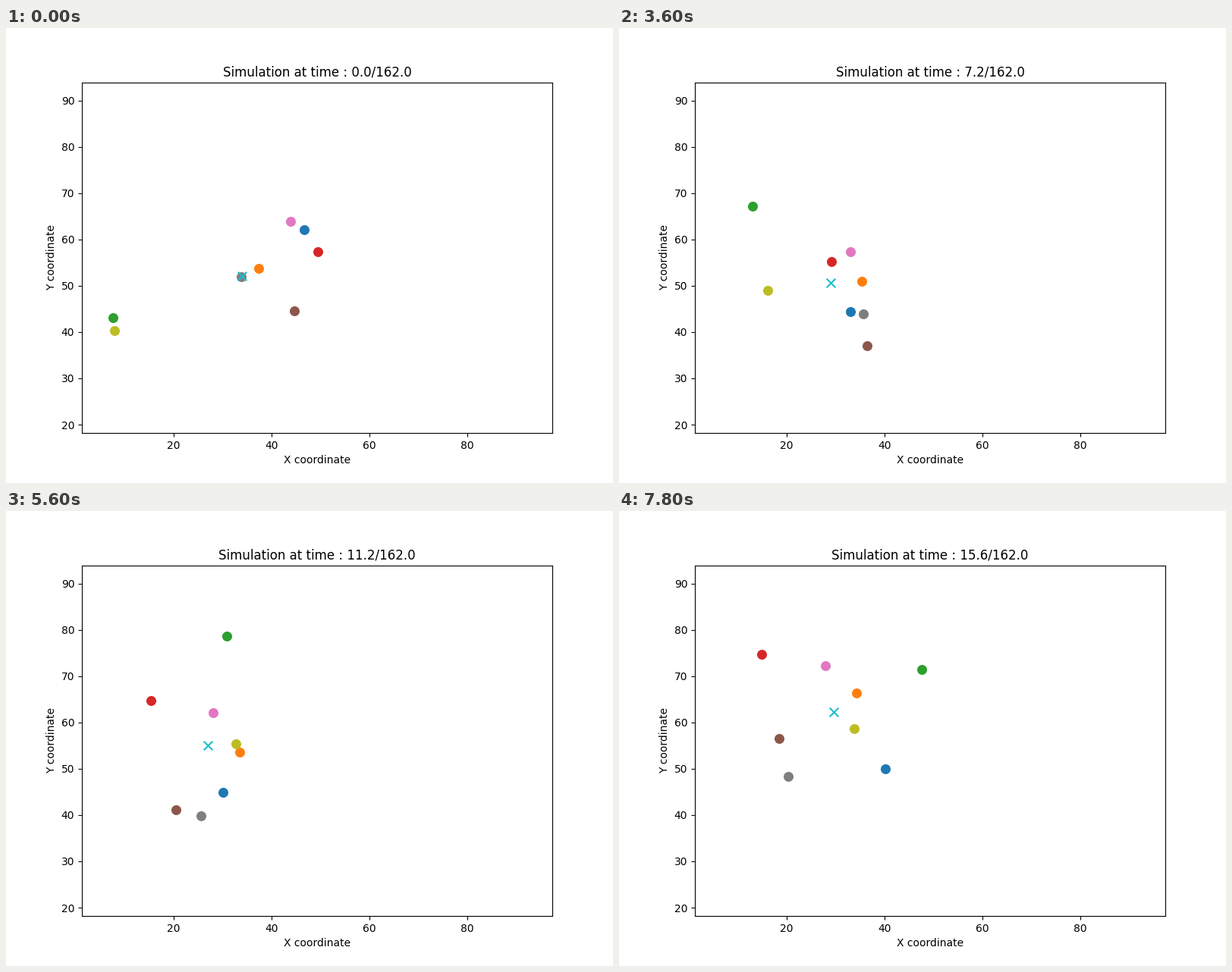
Write a matplotlib script that moves like this. It is 800 by 600 pixels and loops after 8000 ms.

```python
import numpy as np
import matplotlib.pyplot as plt
from matplotlib.animation import FuncAnimation

FRAMES = 40
STEP_MS = 200
STEP_TIME = 0.4
END_TIME = 162.0
XLIM = (1.24, 97.36)
YLIM = (18.2, 93.85)
BOX = (100, 720, 72, 534)  # axes left, right, top, bottom in pixels

KEYS = [0, 6, 13, 18, 25, 32, 39]

# Waypoints (x, y) in stage pixels, one per key, in drawing order
PATHS = {
    "tab:blue": [(393, 265.5), (367, 315.7), (328.5, 372), (304.5, 374.2),
                 (279, 375), (305.5, 361.7), (351.2, 340.3)],
    "tab:orange": [(333, 316.5), (348.5, 330), (336.5, 333), (319.7, 334.3),
                   (304, 326.4), (315.5, 299.2), (312.7, 240)],
    "tab:green": [(141.2, 381.5), (119, 356.4), (153.5, 291), (176, 234.5),
                  (255.8, 171), (335.7, 172.5), (399.2, 208.8)],
    "tab:red": [(411, 295), (397, 304), (337.6, 331.7), (279.5, 308.2),
                (209, 269.2), (175.2, 225.2), (188, 189.4)],
    "tab:brown": [(379.5, 372.5), (370.5, 395.8), (347.8, 413.6), (326.7, 418.7),
                  (250.3, 403.5), (200.2, 373.3), (211.4, 300)],
    "tab:pink": [(374.7, 254.7), (337.4, 297.6), (318, 306.6), (304.5, 295),
                 (287.3, 279), (258, 245), (272.4, 204.2)],
    "tab:gray": [(310, 328), (351.2, 325.8), (348.6, 355.8), (322.2, 376.6),
                 (272, 401.7), (240.8, 399.5), (222.5, 349.8)],
    "tab:olive": [(142.7, 399), (106.4, 380.2), (144, 367.5), (195.8, 345.6),
                  (279.8, 308.5), (321, 309.4), (310, 287)],
}

# Extra waypoints where a dot turns sharply
TURNS = {
    "tab:red": {34: (169.6, 214), 36: (174, 204)},
    "tab:gray": {30: (248, 400.3), 36: (228.5, 378)},
}


def to_data(points):
    left, right, top, bottom = BOX
    x = np.interp(points[:, 0], (left, right), XLIM)
    y = np.interp(points[:, 1], (top, bottom), YLIM[::-1])
    return np.column_stack([x, y])


def smooth_path(color):
    """Cubic Hermite curve through the waypoints, sampled at every frame."""
    stops = dict(zip(KEYS, PATHS[color])) | TURNS.get(color, {})
    t = np.array(sorted(stops), dtype=float)
    p = to_data(np.array([stops[k] for k in sorted(stops)]))
    slope = np.gradient(p, t, axis=0, edge_order=2)
    frames = np.arange(FRAMES)
    i = np.clip(np.searchsorted(t, frames, side="right") - 1, 0, len(t) - 2)
    span = (t[i + 1] - t[i])[:, None]
    s = (frames - t[i])[:, None] / span
    return ((2 * s**3 - 3 * s**2 + 1) * p[i]
            + (3 * s**2 - 2 * s**3) * p[i + 1]
            + (s**3 - 2 * s**2 + s) * span * slope[i]
            + (s**3 - s**2) * span * slope[i + 1])


tracks = np.array([smooth_path(c) for c in PATHS])
centroid = tracks.mean(axis=0)

fig, ax = plt.subplots(figsize=(8, 6), dpi=100)
ax.set(xlim=XLIM, ylim=YLIM, xlabel="X coordinate", ylabel="Y coordinate")
ax.set_xticks(range(20, 81, 20))
title = ax.set_title("")
dots = [ax.scatter([], [], s=70, color=c) for c in PATHS]
cross = ax.scatter([], [], s=70, color="tab:cyan", marker="x")


def update(n):
    for dot, track in zip(dots, tracks):
        dot.set_offsets(track[n])
    cross.set_offsets(centroid[n])
    title.set_text(f"Simulation at time : {n * STEP_TIME:.1f}/{END_TIME}")
    return [*dots, cross, title]


anim = FuncAnimation(fig, update, frames=FRAMES, interval=STEP_MS,
                     repeat=True, repeat_delay=0)
plt.show()
```
